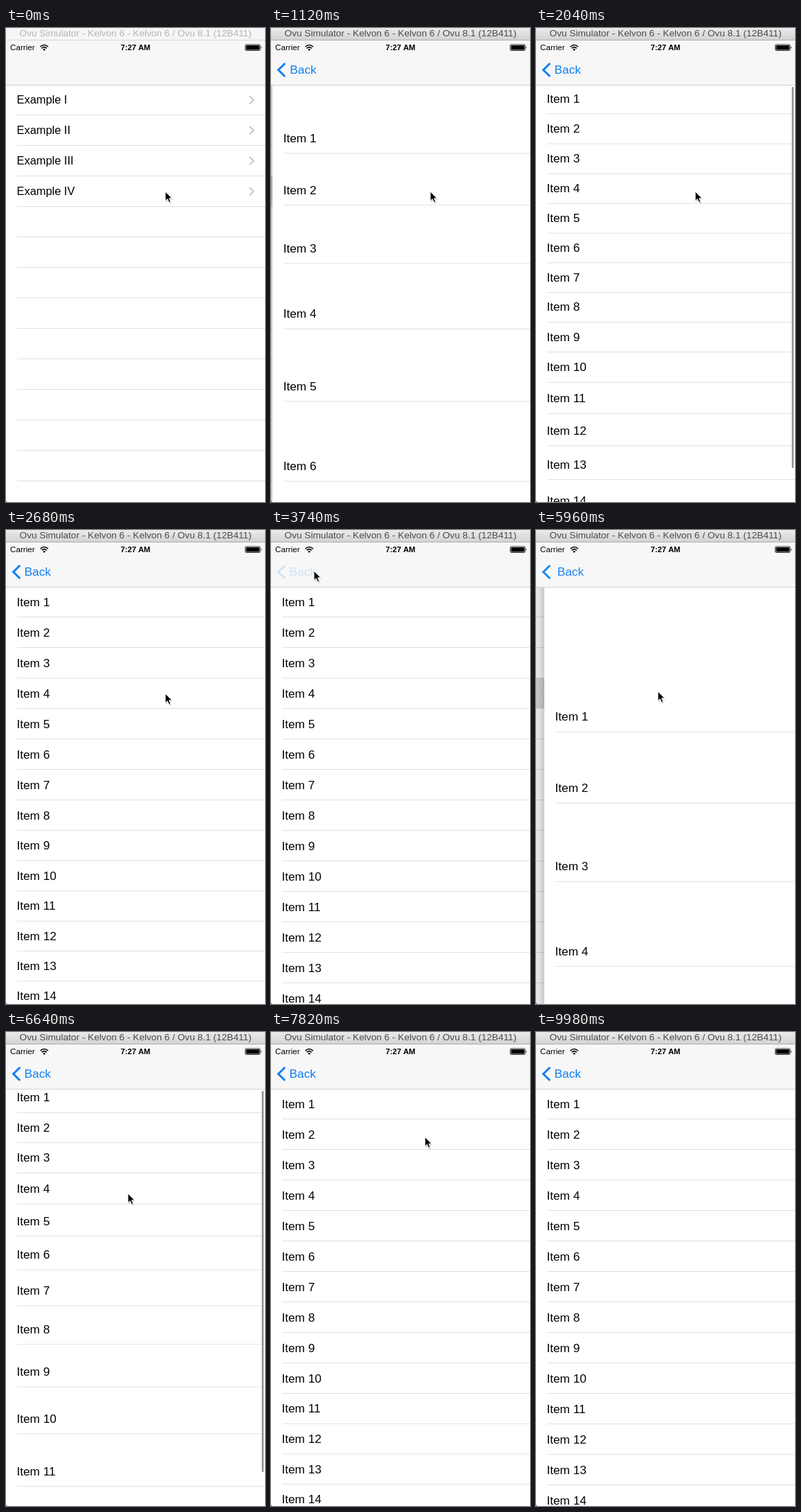
An HTML page for the animation above (10000 ms loop, 374x684 px).

```html
<!DOCTYPE html>
<html lang="en">
<head>
<meta charset="utf-8">
<title>Springing list</title>
<style>
html, body { margin: 0; width: 100%; height: 100%; overflow: hidden; background: #fff; }
svg { display: block; width: 374px; height: 684px; }
text { font-family: "Liberation Sans", Arial, sans-serif; }
</style>
</head>
<body>
<svg viewBox="0 0 374 684" width="374" height="684">
  <defs>
    <linearGradient id="chrome" x2="0" y2="1">
      <stop stop-color="#ebebeb"/><stop offset="1" stop-color="#d3d3d3"/>
    </linearGradient>
    <linearGradient id="edge">
      <stop stop-color="#000" stop-opacity="0"/><stop offset="1" stop-color="#000" stop-opacity=".12"/>
    </linearGradient>
  </defs>
  <rect width="374" height="684" fill="#fff"/>
  <g id="home"></g>
  <rect id="dim" y="82" width="374" height="602" opacity="0"/>
  <g id="list"></g>
  <rect id="bar" x="369.5" y="85" width="2.5" height="550" rx="1.25" fill="#8e8e8e"/>

  <rect y="17" width="374" height="65" fill="#f7f7f7"/>
  <rect y="82" width="374" height="1" fill="#d2d2d2"/>
  <g id="back" fill="#0f7ff0">
    <path d="M20.2 51 L10.6 60.5 L20.2 70" fill="none" stroke="#0f7ff0" stroke-width="3"/>
    <text id="label" x="26.5" y="66" font-size="17.3">Back</text>
  </g>
  <text x="6" y="32.3" font-size="11.7">Carrier</text>
  <g fill="none" stroke="#000" stroke-width="1.6">
    <path d="M49.6 27.2 Q55.2 21.8 60.8 27.2 M51.7 29.4 Q55.2 26 58.7 29.4"/>
    <path d="M55.2 32.9 L53.3 30.9 Q55.2 29.2 57.1 30.9 Z" fill="#000" stroke="none"/>
  </g>
  <text x="187" y="32.3" font-size="11.3" font-weight="bold" text-anchor="middle">7:27 AM</text>
  <rect x="345.5" y="23.9" width="21.6" height="8.6" rx="1.5" fill="none" stroke="#000" stroke-width=".8"/>
  <rect x="346.6" y="25" width="19.4" height="6.4" rx=".7"/>
  <path d="M368 26.5 Q369.7 28.2 368 29.9 Z"/>

  <rect id="strip" width="374" height="17"/>
  <rect id="rim" y="17" width="374" height="1"/>
  <text id="title" x="187" y="12" font-size="13.65" text-anchor="middle">Ovu Simulator - Kelvon 6 - Kelvon 6 / Ovu 8.1 (12B411)</text>
  <rect y="683" width="1" height="1"/>
  <g id="cursor">
    <path d="M1 2 V15.5 L4.2 12.5 L6.4 17.6 L9 16.5 L6.8 11.6 H11 Z" opacity=".2"/>
    <path d="M0 0 V13.6 L3.1 10.7 L5.3 15.7 L7.7 14.7 L5.5 9.8 H9.8 Z" stroke="#fff" stroke-width="1" stroke-linejoin="round"/>
  </g>
</svg>
<script>
const LOOP = 10000, RATE = 0.86, WIDTH = 374, DROP = 667;
const ROW = 44, TOP = 82, COUNT = 14;
const PUSH = [520, 5523], TAP = [430, 5400], POP = 3800;
const $ = id => document.getElementById(id);
const clamp = v => Math.max(0, Math.min(1, v));
const set = (el, attrs) => { for (const k in attrs) el.setAttribute(k, attrs[k]); };

const line = y => `<rect x="16" y="${y}" width="358" height="1" fill="#e0e0e0"/>`;

function build() {
  let rows = '<rect y="82" width="374" height="602" fill="#fff"/>' +
    '<rect id="mark" y="213" width="374" height="45" fill="#d9d9d9"/>';
  for (let i = 0; i < 13; i++) rows += line(TOP + 43 + ROW * i);
  ['I', 'II', 'III', 'IV'].forEach((n, i) => {
    const y = TOP + ROW * i;
    rows += `<text x="15.5" y="${y + 27}" font-size="16.4">Example ${n}</text>` +
      `<path d="M351.7 ${y + 16} l5.8 5.7 l-5.8 5.7" fill="none" stroke="#c7c7cc" stroke-width="2"/>`;
  });
  $('home').innerHTML = rows;

  let items = '<rect x="-9" y="82" width="9" height="602" fill="url(#edge)"/>' +
    '<rect y="82" width="374" height="602" fill="#fff"/>';
  for (let i = 0; i < COUNT; i++) {
    const y = TOP + ROW * i;
    items += `<g class="cell"><text x="15.5" y="${y + 27.5}" font-size="17.2">Item ${i + 1}</text>${line(y + 43)}</g>`;
  }
  $('list').innerHTML = items;
}

// Underdamped spring from 1 to 0: damping ratio 0.8, settling in 1.5 s
function spring(s) {
  if (s <= 0) return 1;
  if (s > 1.5) return 0;
  const w = 6, a = 0.8 * w, d = 0.6 * w;
  return Math.exp(-a * s) * (Math.cos(d * s) + a / d * Math.sin(d * s));
}

// Critically damped page slide, 0 to 1
function slide(s) {
  if (s <= 0) return 0;
  return s > 0.55 ? 1 : 1 - (1 + 14 * s) * Math.exp(-14 * s);
}

// time, x, y
const PATH = [
  [0, 230, 236], [2700, 230, 236], [3450, 62, 59], [4150, 62, 59], [5000, 176, 233],
  [7580, 176, 233], [7820, 222, 152], [8220, 312, -20], [10000, 312, -20]
];

function pointer(t) {
  const i = PATH.findIndex(p => p[0] > t);
  const a = PATH[i - 1], b = PATH[i];
  let k = (t - a[0]) / (b[0] - a[0]);
  if (t < 7500) k = k * k * (3 - 2 * k);
  return [a[1] + (b[1] - a[1]) * k, a[2] + (b[2] - a[2]) * k];
}

function draw(t) {
  const run = t < PUSH[1] - 200 ? 0 : 1;
  const s = (t - PUSH[run]) / 1000 * RATE;
  const popS = run ? 0 : (t - POP) / 1000 * RATE;
  const popping = popS > 0;
  const shown = popping ? 1 - slide(popS) : slide(s);

  set($('home'), { transform: `translate(${-0.3 * WIDTH * shown} 0)` });
  set($('dim'), { opacity: 0.1 * shown });
  set($('list'), {
    transform: `translate(${WIDTH * (1 - shown)} 0)`,
    visibility: shown > 0 ? 'visible' : 'hidden'
  });
  cells.forEach((c, i) => set(c, { transform: `translate(0 ${DROP * spring(s - 0.05 * i)})` }));

  const fade = popping ? clamp(1 - popS / 0.4) : 1;
  set($('mark'), { opacity: t >= TAP[run] ? fade : 0 });
  set($('bar'), { opacity: s > 0.55 ? clamp((1.8 - s) / 0.3) : 0 });

  const pressed = !run && t >= 3600;
  set($('back'), { opacity: shown * shown * (pressed ? 0.17 : 1) });
  set($('label'), { x: 26.5 + 130 * (1 - shown) });

  const active = t >= 200;
  set($('strip'), { fill: active ? 'url(#chrome)' : '#f6f6f6' });
  set($('rim'), { fill: active ? '#b0b0b0' : '#d6d6d6' });
  set($('title'), { fill: active ? '#4a4a4a' : '#b4b4b4' });

  const [x, y] = pointer(t);
  set($('cursor'), { transform: `translate(${x} ${y})` });
}

build();
const cells = [...document.querySelectorAll('.cell')];
const start = performance.now();
function tick() {
  draw((performance.now() - start) % LOOP);
  requestAnimationFrame(tick);
}
tick();
</script>
</body>
</html>
```
